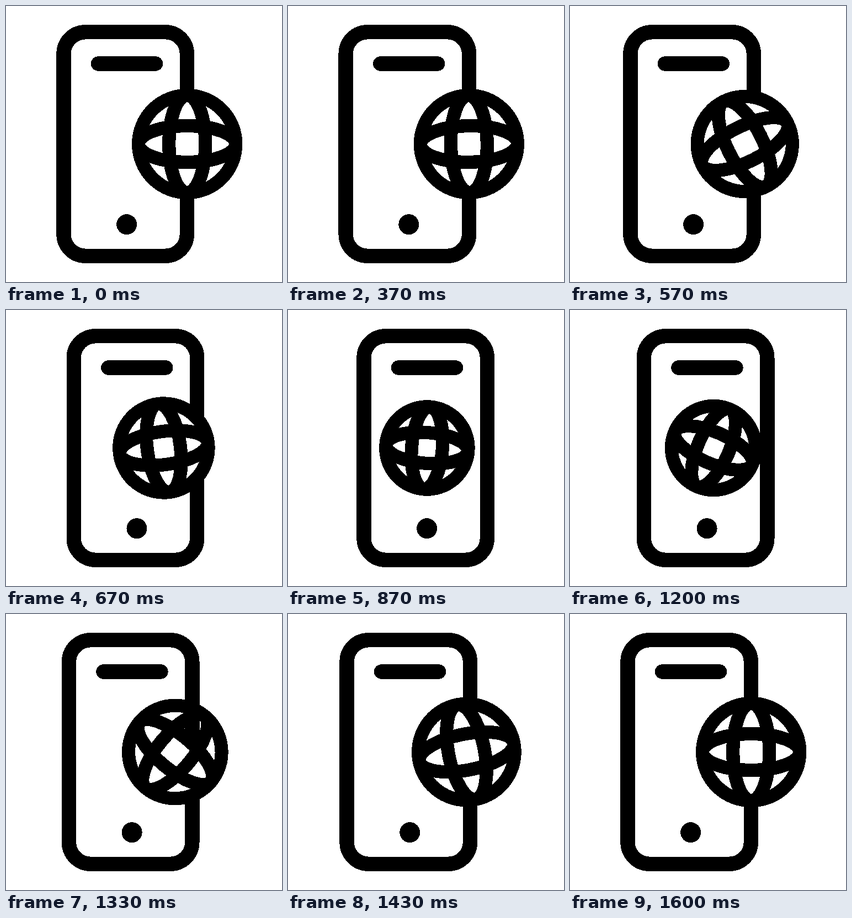
An HTML page that plays this animation: 500x500 px, repeating every 1700 ms.

```html
<!DOCTYPE html>
<html lang="en">
<head>
<meta charset="utf-8">
<title>Phone and globe</title>
<style>
  html, body { margin: 0; width: 100%; height: 100%; overflow: hidden; background: #fff; }
  svg { display: block; width: 100vw; height: 100vh; }
</style>
</head>
<body>
<svg viewBox="0 0 500 500" fill="none" stroke="#000" shape-rendering="crispEdges">
  <g id="phone" stroke-width="26.4">
    <rect x="104.5" y="47.2" width="223.4" height="405.6" rx="39.5"/>
    <path d="M167 104.5H271" stroke-linecap="round"/>
    <circle cx="218.7" cy="395.7" r="18.5" fill="#000" stroke="none"/>
  </g>
  <circle id="disc" cy="250" fill="#fff" stroke="none"/>
  <path id="wall" stroke-width="26.4"/>
  <g id="globe" stroke-width="24.2">
    <circle id="ring"/>
    <ellipse id="tall"/>
    <ellipse id="wide"/>
  </g>
</svg>
<script>
const LOOP = 1700;
const STEP = 100 / 3;
const [phone, disc, wall, globe, ring, tall, wide] =
  ["phone", "disc", "wall", "globe", "ring", "tall", "wide"].map(id => document.getElementById(id));

function set(el, attrs) {
  for (const key in attrs) el.setAttribute(key, attrs[key]);
}

// Cubic Bezier easing (0.8, 0, 0.25, 1), solved by bisection.
function ease(x) {
  let lo = 0, hi = 1, s = 0.5;
  for (let i = 0; i < 24; i++) {
    s = (lo + hi) / 2;
    const r = 1 - s;
    if (3 * r * r * s * 0.8 + 3 * r * s * s * 0.25 + s * s * s < x) lo = s;
    else hi = s;
  }
  return s * s * (3 - 2 * s);
}

const span = (t, from, to) => Math.min(1, Math.max(0, (t - from) / (to - from)));

// 0: globe at the phone's edge, 1: globe centred inside it.
function progress(t) {
  return t < 980 ? ease(span(t, 312, 990)) : 1 - ease(span(t, 976, 1589));
}

// How far the phone's side wall is closed behind the globe.
function closing(t) {
  return t < 980 ? span(t, 670, 780) : 1 - span(t, 1250, 1380);
}

function draw(time) {
  // The motion advances at 30 steps per second.
  const step = Math.floor((time % LOOP + 4) / STEP);
  const t = Math.round(step * STEP / 10) * 10;
  const p = progress(t);
  const scale = 1 - 0.156 * p;
  const big = 88.1 * scale, small = 33 * scale;
  const slide = 33.8 * p, x = 328.2 - 78.2 * p;

  set(phone, { transform: `translate(${slide} 0)` });
  set(disc, { cx: x, r: big });
  set(wall, { d: `M${327.9 + slide} 150v${200 * closing(t)}` });
  set(globe, { transform: `translate(${x} 250) rotate(${-180 * p})` });
  set(ring, { r: big });
  set(tall, { rx: small, ry: big });
  set(wide, { rx: big, ry: small });
}

const start = performance.now();
function tick() {
  draw(performance.now() - start);
  requestAnimationFrame(tick);
}
tick();
</script>
</body>
</html>
```
